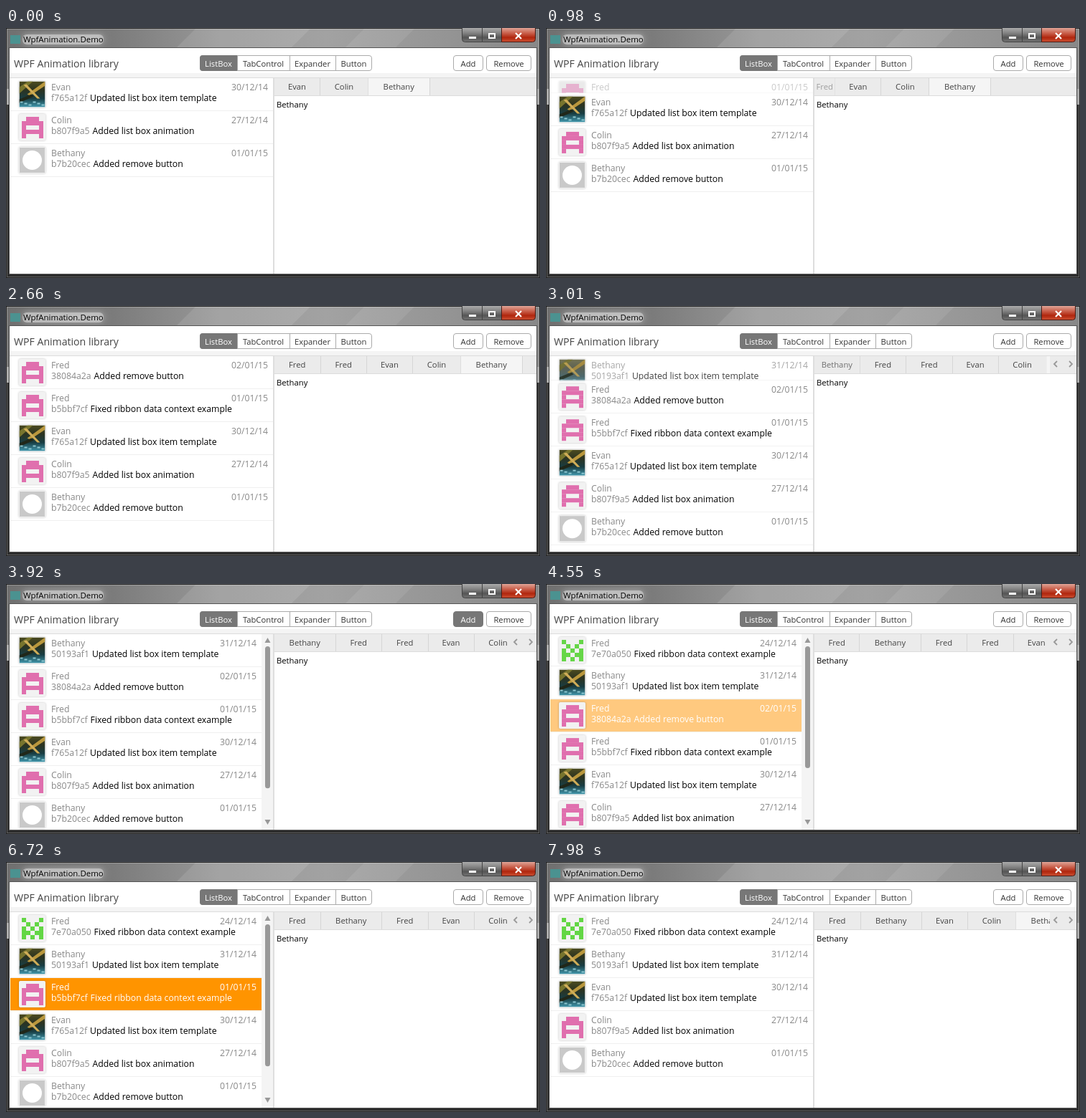
These frames come from a looping animation (744x349 px, 8000 ms). An HTML page with a canvas:

```html
<!DOCTYPE html>
<html lang="en">
<head>
<meta charset="utf-8">
<title>WpfAnimation.Demo</title>
<style>
html, body { margin: 0; width: 744px; height: 349px; overflow: hidden; background: #222; }
canvas { display: block; }
</style>
</head>
<body>
<canvas id="stage" width="744" height="349"></canvas>
<script>
const ctx = document.getElementById('stage').getContext('2d');
const LOOP = 8000, ROW = 46, TOP = 70, BOTTOM = 343, TAB_X = 373.5, TAB_END = 738;
const REMOVE_MS = 210;
const GRAY = '#888', DARK = '#777', ORANGE = '#ff9400';

const TAB_W = { Evan: 64, Colin: 67, Bethany: 85.5, Fred: 64.5 };
const ADDED = 'Added remove button';
const RIBBON = 'Fixed ribbon data context example';
const UPDATED = 'Updated list box item template';

// from/ms: when the row enters; out: when it leaves; pick: selection fade [start, end]; blur: focus lost
const items = [
  { who: 'Fred', hash: '7e70a050', msg: RIBBON, date: '24/12/14', pic: 'green', from: 3990, ms: 770 },
  { who: 'Bethany', hash: '50193af1', msg: UPDATED, date: '31/12/14', pic: 'photo', from: 2730, ms: 770 },
  { who: 'Fred', hash: '38084a2a', msg: ADDED, date: '02/01/15', pic: 'pink', from: 1890, ms: 560,
    out: 5880, pick: [4410, 4690], blur: 5740 },
  { who: 'Fred', hash: 'b5bbf7cf', msg: RIBBON, date: '01/01/15', pic: 'pink', from: 840, ms: 770,
    out: 7770, pick: [6370, 6720], blur: 7630 },
  { who: 'Evan', hash: 'f765a12f', msg: UPDATED, date: '30/12/14', pic: 'photo' },
  { who: 'Colin', hash: 'b807f9a5', msg: 'Added list box animation', date: '27/12/14', pic: 'pink' },
  { who: 'Bethany', hash: 'b7b20cec', msg: ADDED, date: '01/01/15', pic: 'disc', current: true }
];
const addPress = [[770, 840], [1750, 1890], [2450, 2660], [3920, 3990]];
const removePress = [[5740, 5880], [7630, 7770]];

const clamp = v => Math.max(0, Math.min(1, v));
const easeOut = v => 1 - Math.pow(1 - v, 3);
const within = (t, spans) => spans.some(([a, b]) => t >= a && t < b);

function presence(item, t) {
  let p = item.from === undefined ? 1 : easeOut(clamp((t - item.from) / item.ms));
  if (item.out !== undefined) p *= 1 - clamp((t - item.out) / REMOVE_MS);
  return p;
}

function rect(x, y, w, h, fill) {
  ctx.fillStyle = fill;
  ctx.fillRect(x, y, w, h);
}

function poly(points, fill) {
  ctx.beginPath();
  points.forEach(([x, y]) => ctx.lineTo(x, y));
  ctx.closePath();
  ctx.fillStyle = fill;
  ctx.fill();
}

function box(x, y, w, h, r, fill, stroke) {
  ctx.beginPath();
  ctx.roundRect(x, y, w, h, r);
  if (fill) { ctx.fillStyle = fill; ctx.fill(); }
  if (stroke) { ctx.strokeStyle = stroke; ctx.lineWidth = 1; ctx.stroke(); }
}

function text(str, x, y, size, color, align = 'left') {
  ctx.font = `${size}px "Open Sans", "Noto Sans", sans-serif`;
  ctx.textAlign = align;
  ctx.fillStyle = color;
  ctx.fillText(str, x, y);
}

function clipped(x, y, w, h, draw) {
  ctx.save();
  ctx.beginPath();
  ctx.rect(x, y, w, h);
  ctx.clip();
  draw();
  ctx.restore();
}

function vertical(y0, y1, ...colors) {
  const g = ctx.createLinearGradient(0, y0, 0, y1);
  colors.forEach((c, i) => g.addColorStop(i / (colors.length - 1), c));
  return g;
}

function drawFrame() {
  const g = ctx.createLinearGradient(0, 0, 744, 0);
  ['#707070', '#7b7b7b', '#989898', '#a2a2a2', '#969696', '#888'].forEach((c, i) => g.addColorStop(i / 5, c));
  rect(0, 0, 744, 107, g);
  poly([[265, 0], [425, 0], [397, 28], [237, 28]], 'rgba(255,255,255,.1)');
  poly([[500, 0], [570, 0], [542, 28], [472, 28]], 'rgba(255,255,255,.08)');
  rect(0, 85, 744, 22, '#a6a6a6');
  rect(0, 107, 744, 242, '#2b2b2b');
  ctx.strokeStyle = '#222';
  ctx.lineWidth = 1;
  ctx.strokeRect(0.5, 0.5, 743, 348);
  ctx.strokeStyle = 'rgba(255,255,255,.25)';
  ctx.strokeRect(1.5, 1.5, 741, 346);

  ctx.save();
  ctx.shadowColor = 'rgba(255,255,255,.75)';
  ctx.shadowBlur = 10;
  box(23, 9, 113, 14, 6, 'rgba(225,225,225,.5)');
  ctx.restore();
  rect(6, 10, 14, 12, '#4b9290');
  text('WpfAnimation.Demo', 24, 20, 11.45, '#000');

  box(635.5, -4.5, 28, 24, [0, 0, 0, 4], vertical(0, 20, '#aaa', '#858585', '#555', '#777'), '#444');
  box(663.5, -4.5, 27, 24, 0, vertical(0, 20, '#aaa', '#858585', '#555', '#777'), '#444');
  box(690.5, -4.5, 47, 24, [0, 0, 4, 0], vertical(0, 20, '#dfa396', '#cb6450', '#b0260d', '#cf5437'), '#4b1c16');
  rect(645, 12, 10, 3, '#fff');
  ctx.strokeStyle = '#fff';
  ctx.lineWidth = 2;
  ctx.strokeRect(673, 8, 8, 6);
  ctx.beginPath();
  ctx.moveTo(710, 7); ctx.lineTo(718, 15);
  ctx.moveTo(718, 7); ctx.lineTo(710, 15);
  ctx.lineWidth = 2.2;
  ctx.stroke();

  rect(4, 27, 736, 317, '#555');
  rect(5, 28, 734, 315, '#fff');
}

function button(label, x, w, down) {
  box(x + 0.5, 38.5, w - 1, 21, 3.5, down ? DARK : '#fff', down ? DARK : '#aaa');
  text(label, x + w / 2, 53.5, 11.25, down ? '#fff' : '#333', 'center');
}

function drawHeader(t) {
  rect(5, 63, 734, 6, '#f4f4f4');
  rect(5, 69, 734, 1, '#dcdcdc');
  text('WPF Animation library', 11, 55, 14.1, '#444');
  box(270.5, 38.5, 239, 21, 3.5, '#fff', '#aaa');
  box(270, 38, 52, 22, [4, 0, 0, 4], DARK);
  const edges = [270, 322, 395, 459, 510];
  ['ListBox', 'TabControl', 'Expander', 'Button'].forEach((label, i) => {
    if (i) rect(edges[i], 38, 1, 22, '#aaa');
    text(label, (edges[i] + edges[i + 1]) / 2, 53.5, 11.25, i ? '#333' : '#fff', 'center');
  });
  button('Add', 623, 42, within(t, addPress));
  button('Remove', 669, 63, within(t, removePress));
}

const glyphs = {
  pink: ['#e06fae', '.###. ##### #...# ##### #...#'],
  green: ['#63d645', '#...# .#.#. #.#.# ##.## #.#.#']
};

function drawPhoto(x, y) {
  clipped(x, y, 36, 36, () => {
    rect(x, y, 36, 36, vertical(y, y + 36, '#4c4b20', '#2c3320', '#183d43', '#4298ad'));
    poly([[x, y + 8], [x + 12, y], [x + 19, y], [x, y + 17]], '#77742e');
    poly([[x + 36, y], [x + 36, y + 6], [x + 15, y + 20], [x + 11, y + 18]], '#b9973d');
    poly([[x + 6, y + 5], [x + 10, y + 4], [x + 29, y + 24], [x + 25, y + 24]], '#d0ad58');
    poly([[x, y + 25], [x + 17, y + 18], [x + 20, y + 21], [x, y + 30]], '#202719');
    for (let i = 0; i < 6; i++) rect(x + i * 6 + 1, y + 28 + (i % 3) * 2, 4, 2, '#8cc6d0');
  });
}

function drawAvatar(pic, y) {
  ctx.save();
  ctx.shadowColor = 'rgba(0,0,0,.25)';
  ctx.shadowBlur = 3;
  box(18, y, 37, 37, 2, '#f2f2f2');
  ctx.restore();
  if (pic === 'photo') return drawPhoto(18.5, y + 0.5);
  if (pic === 'disc') {
    rect(19, y + 1, 35, 35, '#c9c9c9');
    ctx.beginPath();
    ctx.arc(36.5, y + 18.5, 13.5, 0, Math.PI * 2);
    ctx.fillStyle = '#fff';
    ctx.fill();
    return;
  }
  const [color, cells] = glyphs[pic];
  cells.split(' ').forEach((line, r) => [...line].forEach((c, k) => {
    if (c === '#') rect(22 + k * 6, y + 4 + r * 6, 6, 6, color);
  }));
}

function drawRow(item, y, p, right, t) {
  const h = ROW * p;
  const pick = item.pick ? clamp((t - item.pick[0]) / (item.pick[1] - item.pick[0])) : 0;
  const focused = pick > 0 && t < item.blur;
  clipped(6, y, right - 6, h, () => {
    ctx.globalAlpha = p;
    if (focused) {
      ctx.globalAlpha = p * pick;
      rect(6, y, right - 6, ROW - 1, ORANGE);
      ctx.globalAlpha = p;
    } else if (pick) {
      rect(6, y, right - 6, ROW - 1, '#f2f2f2');
    }
    const lit = focused && pick > 0.5;
    const soft = lit ? '#fff' : GRAY;
    drawAvatar(item.pic, y + 4);
    text(item.who, 63, y + 17, 12.25, soft);
    text(item.date, right - 7, y + 17, 12.25, soft, 'right');
    text(item.hash, 63, y + 32, 12.25, soft);
    const x = 63 + ctx.measureText(item.hash).width + 3.9;
    text(item.msg, x, y + 32, 12.25, lit ? '#fff' : '#000');
    rect(6, y + h - 1, right - 6, 1, '#efefef');
  });
}

function drawScrollbar(count) {
  rect(356, TOP, 16, BOTTOM - TOP, '#f4f4f4');
  box(361, 87, 7, 238 * 5 / count, 3.5, '#999');
  poly([[360.5, 82], [364.5, 75], [368.5, 82]], '#999');
  poly([[360.5, 329], [364.5, 336], [368.5, 329]], '#999');
}

function drawList(live, t) {
  const total = live.reduce((sum, e) => sum + e.p * ROW, 0);
  const scroll = total > BOTTOM - TOP;
  let y = TOP;
  clipped(5, TOP, 368, BOTTOM - TOP, () => {
    for (const { item, p } of live) {
      drawRow(item, y, p, scroll ? 356 : 372, t);
      y += ROW * p;
    }
    if (scroll) drawScrollbar(live.length);
  });
  rect(372, TOP, 2, BOTTOM - TOP, '#dedede');
}

function chevron(x, dir) {
  ctx.beginPath();
  ctx.moveTo(x - 2 * dir, 77);
  ctx.lineTo(x + 2 * dir, 81);
  ctx.lineTo(x - 2 * dir, 85);
  ctx.strokeStyle = '#999';
  ctx.lineWidth = 1.8;
  ctx.stroke();
}

function drawTabs(live) {
  rect(374, TOP, 365, 24, '#ebebeb');
  const total = live.reduce((sum, e) => sum + e.p * TAB_W[e.item.who], 0);
  const overflow = total > TAB_END - TAB_X;
  let x = TAB_X;
  clipped(374, TOP, (overflow ? 702 : TAB_END) - 374, 24, () => {
    for (const { item, p } of live) {
      const w = TAB_W[item.who] * p;
      clipped(x, TOP, w + 1, 24, () => {
        ctx.globalAlpha = p;
        if (item.current) rect(x, TOP, w, 24, '#f5f5f5');
        text(item.who, x + w / 2, 86, 11.25, '#444', 'center');
        rect(Math.floor(x + w), TOP, 1, 24, '#d6d6d6');
      });
      x += w;
    }
  });
  if (overflow) {
    chevron(710, -1);
    chevron(731, 1);
  }
  rect(374, 94, 365, 1, '#dcdcdc');
  text('Bethany', 377, 111, 11.25, '#000');
}

function render(t) {
  const live = items.map(item => ({ item, p: presence(item, t) })).filter(e => e.p > 0);
  drawFrame();
  drawHeader(t);
  drawList(live, t);
  drawTabs(live);
}

const start = performance.now();
function tick() {
  render((performance.now() - start) % LOOP);
  requestAnimationFrame(tick);
}
tick();
</script>
</body>
</html>
```
